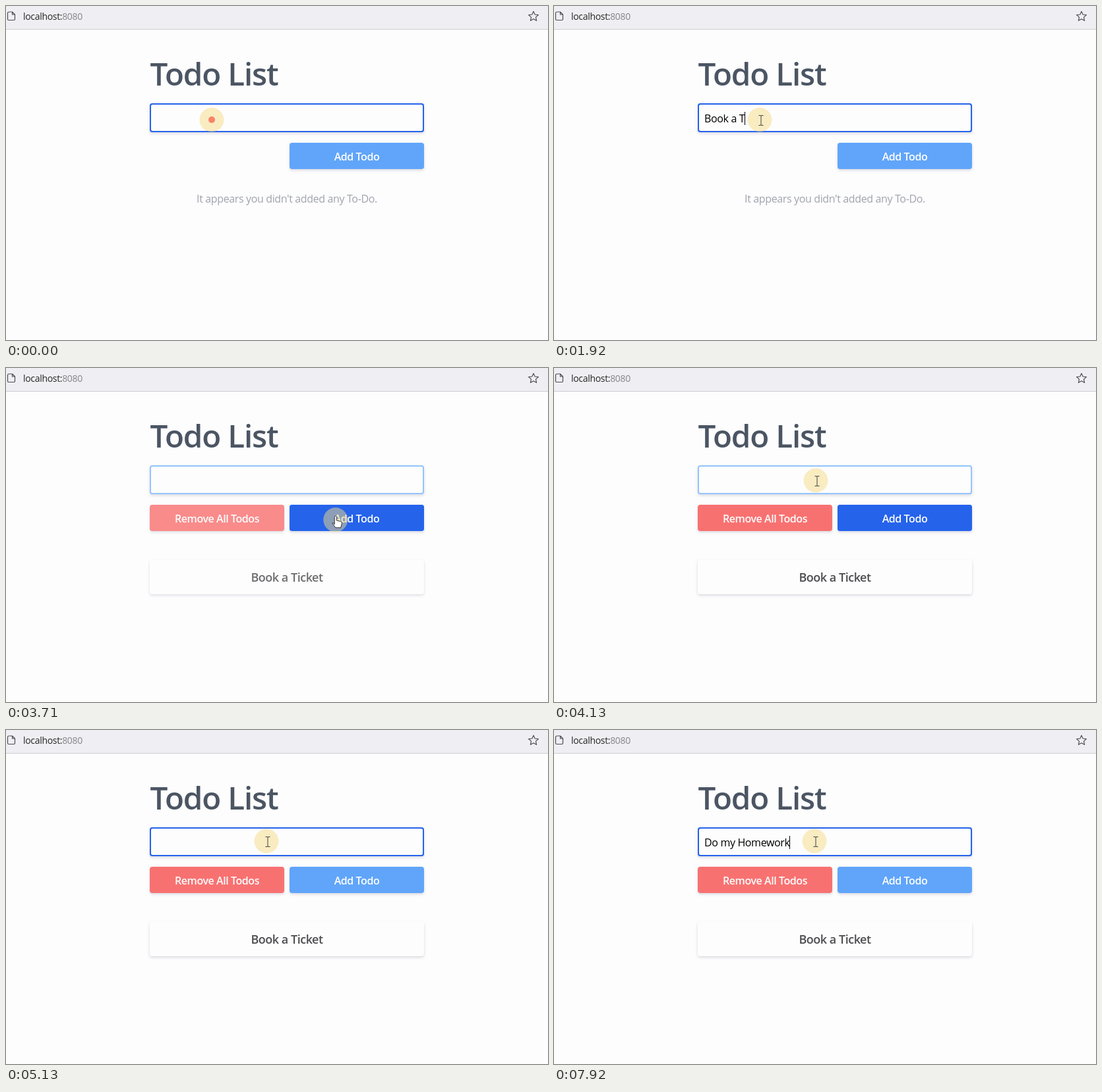
Animation of 822x508 px, one loop 8000 ms. Source, as an HTML page:

```html
<!DOCTYPE html>
<html lang="en">
<head>
<meta charset="utf-8">
<title>Todo List</title>
<style>
  html, body { margin: 0; width: 100%; height: 100%; overflow: hidden; background: #fdfdfd; }
  svg { display: block; width: 822px; height: 508px; }
  text { font: 16px "Open Sans", "Noto Sans", sans-serif; letter-spacing: -.023em; white-space: pre; }
  .bold { font-weight: 600; letter-spacing: -.027em; }
  .mid { text-anchor: middle; }
  .label { fill: #fdfdfd; }
  .lift { filter: drop-shadow(0 2px 2px rgba(70, 75, 110, .2)); }
  .line { fill: none; stroke: #4b4b50; stroke-width: 1.2; stroke-linejoin: round; }
</style>
</head>
<body>
<svg viewBox="0 0 822 508">
  <rect width="822" height="508" fill="#fdfdfd"/>
  <rect width="822" height="35" fill="#efeff3"/>
  <rect y="35" width="822" height="1" fill="#cdcdd0"/>
  <path class="line" d="M4.5 9H9.5L13.5 13V20Q13.5 21.5 12 21.5H4Q2.5 21.5 2.5 20V11Q2.5 9 4.5 9ZM9.5 9V13H13.5"/>
  <path id="star" class="line"/>
  <text x="26" y="21" fill="#252525" style="font-size:14px">localhost:<tspan fill="#858588">8080</tspan></text>

  <text class="bold" x="218.5" y="121" fill="#4b5563" style="font-size:47.5px;letter-spacing:-.024em">Todo List</text>

  <g class="lift">
    <rect x="219" y="149" width="414" height="42" rx="3" fill="#fdfdfd" stroke="#93c5fd" stroke-width="2"/>
    <rect id="focus" x="219" y="149" width="414" height="42" rx="3" fill="none" stroke="#2563eb" stroke-width="2"/>
  </g>
  <text id="entry" x="228" y="177"></text>
  <rect id="caret" y="161" width="1" height="20"/>

  <g class="lift">
    <rect x="430" y="208" width="204" height="40" rx="4" fill="#60a5fa"/>
    <rect id="pressed" x="430" y="208" width="204" height="40" rx="4" fill="#2563eb"/>
  </g>
  <text class="bold mid label" x="532" y="235">Add Todo</text>

  <text id="empty" class="mid" x="426" y="299" fill="#a0a3ae">It appears you didn't added any To-Do.</text>
  <g id="list">
    <rect class="lift" x="218" y="208" width="204" height="40" rx="4" fill="#f87171"/>
    <text class="bold mid label" x="320" y="235">Remove All Todos</text>
    <rect class="lift" x="218" y="292" width="416" height="52" rx="4" fill="#fdfdfd"/>
    <text class="bold mid" x="426" y="325" fill="#4d4d50" style="font-size:18px">Book a Ticket</text>
  </g>

  <g id="pointer">
    <circle cx="-2" cy="-1" r="18.5" fill="#f5dc85" opacity=".5"/>
    <path id="beam" d="M-3.5-7.5H-1Q0-7.5 0-6.5Q0-7.5 1-7.5H3.5M0-6.5V6.5M-3.5 7.5H-1Q0 7.5 0 6.5Q0 7.5 1 7.5H3.5" fill="none" stroke="#404040"/>
    <path id="hand" d="M-3.5 6V-6Q-2-8 -.5-6V0L6 1.5Q8 2 7.5 5L6 11H-2L-7 4Q-6 2-3.5 6Z" fill="#fff" stroke="#333"/>
    <circle id="dot" cx="-2" cy="-1" r="5" fill="#f98368"/>
  </g>
</svg>
<script>
const LOOP = 8000;
const $ = id => document.getElementById(id);
const show = (id, opacity) => $(id).setAttribute('opacity', opacity);
const ramp = (t, start, length) => Math.min(1, Math.max(0, (t - start) / length));
const within = (t, a, b) => t >= a && t < b;

// Focus span and key press times of each entry.
const entries = [
  { text: 'Book a Ticket', from: 300, until: 3480,
    keys: [1000, 1130, 1250, 1370, 1490, 1590, 1750, 1880, 2000, 2130, 2300, 3000, 3120] },
  { text: 'Do my Homework', from: 4280, until: LOOP,
    keys: [5300, 5420, 5550, 5800, 6000, 6170, 6420, 6540, 6660, 6960, 7160, 7480, 7680, 7900] }
];
const path = [
  [0, 314, 174], [3180, 314, 174], [3460, 502, 232], [3700, 502, 232],
  [4090, 399, 172], [4140, 399, 172], [4220, 397, 170], [LOOP, 397, 170]
];
const clicks = [[0, 90], [3500, 3620], [4250, 4370]];

$('star').setAttribute('d', 'M' + Array.from({ length: 10 }, (_, i) => {
  const r = i % 2 ? 3.7 : 7.8, a = (i / 5 - .5) * Math.PI;
  return `${800 + r * Math.cos(a)} ${16 + r * Math.sin(a)}`;
}).join('L') + 'Z');

function pointerAt(t) {
  const i = path.findIndex(p => p[0] > t);
  const [t0, x0, y0] = path[i - 1], [t1, x1, y1] = path[i];
  const u = (t - t0) / (t1 - t0), s = u * u * (3 - 2 * u);
  return [x0 + (x1 - x0) * s, y0 + (y1 - y0) * s];
}

function drawEntry(t) {
  const entry = entries.find(e => within(t, e.from, e.until));
  const typed = entry ? entry.keys.filter(k => k <= t) : [];
  $('entry').textContent = entry ? entry.text.slice(0, typed.length) : '';
  const width = typed.length ? $('entry').getComputedTextLength() : 0;
  $('caret').setAttribute('x', Math.round(228 + width));
  const since = entry ? t - (typed.at(-1) ?? entry.from) : Infinity;
  show('caret', +(since % 1060 < 530));
}

const start = performance.now();
function draw(now) {
  const t = Math.max(0, now - start) % LOOP;
  drawEntry(t);
  show('focus', 1 - ramp(t, 3500, 150) + ramp(t, 4250, 150));
  show('pressed', ramp(t, 3420, 150) - ramp(t, 4250, 250));
  show('empty', +(t < 3580));
  show('list', ramp(t, 3580, 160));

  const [x, y] = pointerAt(t);
  const clicked = clicks.some(([a, b]) => within(t, a, b));
  $('pointer').setAttribute('transform', `translate(${x} ${y})`);
  show('dot', +clicked);
  show('beam', +(y < 192 && !clicked));
  show('hand', +(y >= 192 && !clicked));
  requestAnimationFrame(draw);
}
draw(start);
</script>
</body>
</html>
```
